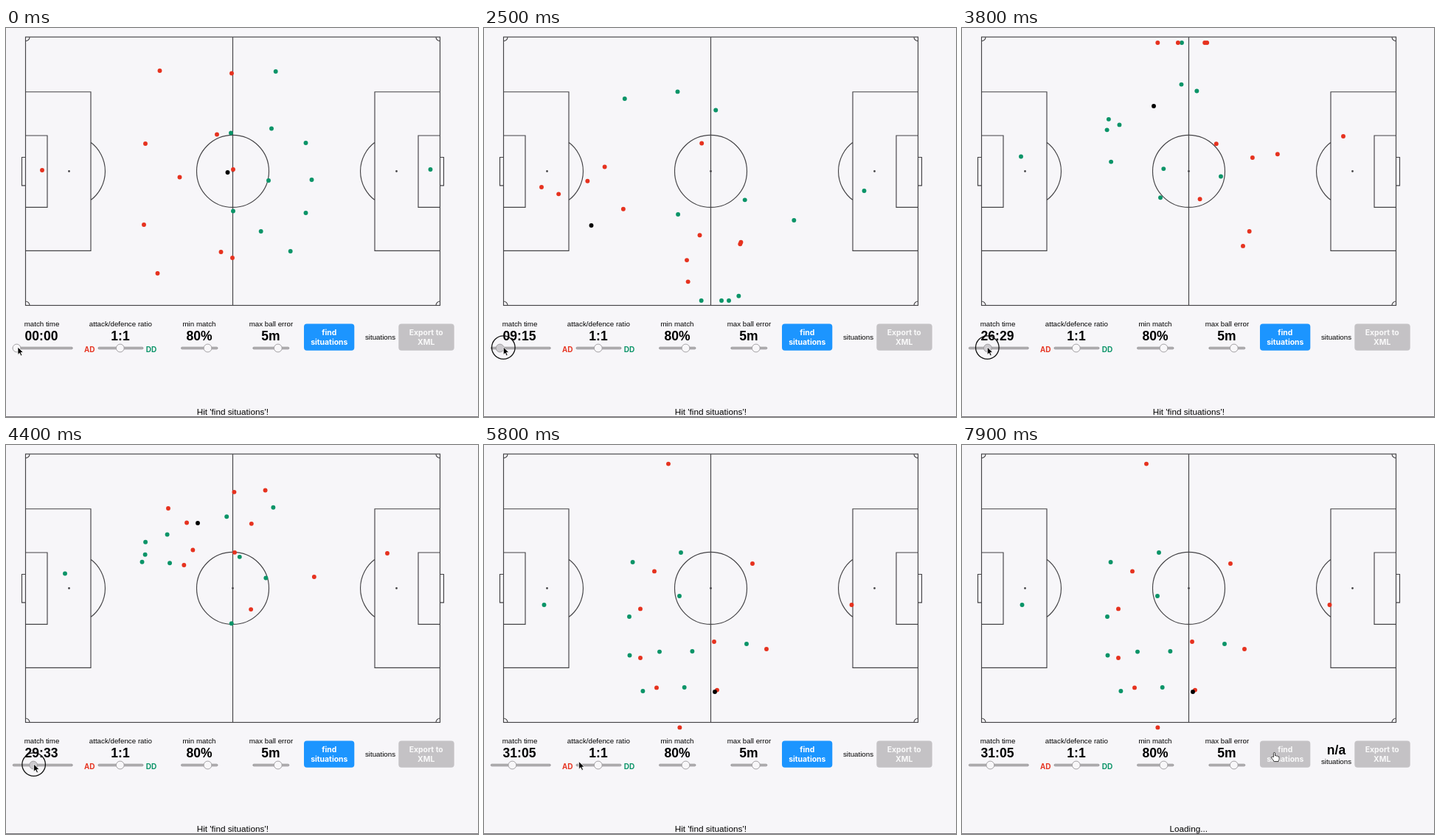
Recreate the animation shown at these times as an HTML page. Size 640 by 528 pixels, loop 8 s.

```html
<!DOCTYPE html>
<html lang="en">
<head>
<meta charset="utf-8">
<title>Match situations</title>
<style>
  html, body { margin: 0; width: 100%; height: 100%; overflow: hidden; background: #f7f6f9; }
  svg { display: block; width: 640px; height: 528px; }
  text { font-family: "Liberation Sans", Arial, sans-serif; text-anchor: middle; fill: #000; }
  .label { font-size: 9.75px; }
  .value { font-size: 17.5px; font-weight: 700; }
  .side { font-size: 10px; font-weight: 700; }
  .status { font-size: 11.75px; }
  .button { font: 700 10.4px Inter, sans-serif; fill: #fff; }
  .pitch { fill: none; stroke: #444346; stroke-width: 1.15; }
  .spot { fill: #333; }
  .track { fill: #b4b2b5; stroke: #8b898c; stroke-width: .8; }
  .thumb { fill: #f8f7f9; stroke: #99979a; stroke-width: .9; }
  .red { fill: #e6321f; }
  .green { fill: #0b9468; }
</style>
</head>
<body>
<svg viewBox="0 0 640 528">
  <path d="M0 527.5H640" stroke="#77757a"/>
  <g class="pitch">
    <rect x="26.5" y="12.2" width="562" height="364.3"/>
    <path d="M307.5 12.2V376.5"/>
    <circle cx="307.5" cy="194.4" r="49"/>
    <g id="half">
      <path d="M26.5 86.7H115V302.3H26.5M26.5 146H56V243.3H26.5M26.5 175.5H21.5V213.8H26.5M115 155.3A49 49 0 0 1 115 233.5"/>
      <path d="M32 12.2A5.5 5.5 0 0 1 26.5 17.7M26.5 371A5.5 5.5 0 0 1 32 376.5"/>
      <circle class="spot" cx="85.5" cy="194.4" r=".8"/>
    </g>
    <use href="#half" transform="matrix(-1 0 0 1 615 0)"/>
    <circle class="spot" cx="307.5" cy="194.4" r=".8"/>
  </g>
  <g id="players"></g>

  <text class="label" x="48.5" y="404.7">match time</text>
  <text class="label" x="155.3" y="404.7">attack/defence ratio</text>
  <text class="label" x="262" y="404.7">min match</text>
  <text class="label" x="359.5" y="404.7">max ball error</text>
  <text class="value" id="clock" x="48" y="423.5">00:00</text>
  <text class="value" x="155" y="423.5">1:1</text>
  <text class="value" x="262" y="423.5">80%</text>
  <text class="value" x="359" y="423.5">5m</text>
  <text class="side red" x="113.3" y="440">AD</text>
  <text class="side green" x="197" y="440">DD</text>
  <g id="sliders"></g>

  <rect id="focus" x="401.3" y="398.8" width="73.7" height="41.5" rx="4" fill="#8cc6fa"/>
  <rect id="find" x="404" y="401.5" width="68.3" height="36.3" rx="4"/>
  <g id="findText">
    <text class="button" x="438.3" y="417">find</text>
    <text class="button" x="438.3" y="430">situations</text>
  </g>
  <text class="value" id="count" x="507.5" y="419.5">n/a</text>
  <text class="label" id="unit" x="507.5">situations</text>
  <rect x="532.3" y="401.5" width="75.4" height="36.3" rx="4" fill="#c4c2c5"/>
  <g opacity=".9">
    <text class="button" x="569.7" y="417">Export to</text>
    <text class="button" x="569.7" y="430">XML</text>
  </g>
  <text class="status" id="status" x="307.3" y="525.3"></text>

  <g id="pointer">
    <circle id="ring" fill="none" stroke="#111" stroke-width="1.3"/>
    <path id="arrow" d="M0 0V10.4L2.4 8.2L4.1 12L5.9 11.2L4.2 7.5H7.5Z" fill="#000" stroke="#fff" stroke-width=".8"/>
    <path id="hand" transform="scale(.92)" d="M-1.2 6V.6Q-1.2-.6 0-.6T1.2.6V4.2Q2.2 3.3 3.2 4.6Q4.5 3.9 5.2 5.2Q7.2 4.8 7.2 6.8V9Q7 10.5 6 12.6H-.3L-2.6 9.4L-4.4 7Q-4.6 5.4-3 5.5Z" fill="#fff" stroke="#111" stroke-width=".9" stroke-linejoin="round"/>
  </g>
</svg>
<script>
const LOOP = 8000, SIZE = 11;
const TEAMS = ["green", "red"];
const $ = id => document.getElementById(id);

function add(parent, tag, attrs) {
  const el = document.createElementNS("http://www.w3.org/2000/svg", tag);
  set(el, attrs);
  return parent.appendChild(el);
}
function set(el, attrs) { for (const key in attrs) el.setAttribute(key, attrs[key]); }
function show(el, on) { el.style.display = on ? "" : "none"; }

const within = (t, from, to) => t >= from && t < to;
const clamp = (v, lo, hi) => Math.min(hi, Math.max(lo, v));
const linear = u => u;
const smooth = u => u * u * (3 - 2 * u);

// Value at time t along [time, value] keys.
function along(keys, t, ease) {
  const i = keys.findIndex(k => k[0] > t);
  if (i < 0) return keys[keys.length - 1][1];
  if (i === 0) return keys[0][1];
  const [t0, a] = keys[i - 1], [t1, b] = keys[i];
  return a + (b - a) * ease((t - t0) / (t1 - t0));
}

function random(seed) {
  const s = Math.sin(seed * 127.1) * 43758.5453;
  return s - Math.floor(s);
}

// The two resting poses are set out by hand, as x, y pairs with the keeper first.
const kickoff = {
  red: [49,193, 208.5,58, 306,61.5, 189,157, 286,144.5, 235.5,202.5, 308,192, 187,267, 291.5,304, 307,312, 205.5,333],
  green: [575.5,192, 365.7,59, 305,142.5, 360,136.5, 406.5,156, 356,207, 414.5,206, 308,248.5, 406.5,251, 345.7,276, 385.7,303],
  ball: [300.5,196]
};
const wing = {
  red: [498.5,217, 250,25.6, 231,171.4, 364,161, 212,222.4, 312,267, 383,277, 212,289, 234,329.4, 316,332.6, 265.4,383.4],
  green: [81.5,217, 201.6,159, 267,146, 265,205, 197,233, 197.5,285.5, 238,280.6, 282.4,280, 356,270, 215.4,334, 271.7,329],
  ball: [313,335]
};

// While scrubbing, a team is a keeper plus ten players spread over an ellipse.
const defending = {
  red: { keeper: [78, 216], centre: [239, 248], radius: [142, 106] },
  green: { keeper: [515.5, 221], centre: [276, 231], radius: [158, 168] },
  ball: [145.5, 268]
};
const midfield = {
  red: { keeper: [517, 147], centre: [307, 154], radius: [132, 176] },
  green: { keeper: [80, 174.5], centre: [277, 139], radius: [106, 144] },
  ball: [260, 106]
};

function spread({ keeper, centre, radius }, seed) {
  const points = [...keeper];
  for (let i = 1; i < SIZE; i++) {
    const angle = 2 * Math.PI * random(seed + i);
    const reach = Math.sqrt(random(seed + i + 0.5));
    points.push(
      centre[0] + radius[0] * reach * Math.cos(angle),
      clamp(centre[1] + radius[1] * reach * Math.sin(angle), 20, 370));
  }
  return points;
}

function poseAt(seconds) {
  if (seconds < 100) return kickoff;
  if (seconds >= 1800) return wing;
  const block = seconds < 1200 ? defending : midfield;
  return { red: spread(block.red, seconds), green: spread(block.green, seconds + 20), ball: block.ball };
}

const playKeys = [[1900, 0], [2500, 555], [3800, 1589], [4700, 1865]];
const pointerKeys = [
  [750, 16], [1150, 34], [1500, 34], [1850, 16], [1950, 16],
  [2500, 26.3], [3800, 34.3], [4700, 38.8], [5550, 38.8], [6350, 423.5]
];

const dot = team => add($("players"), "circle", { r: 2.95, class: team });
const dots = { ball: [dot("ball")] };
for (const team of TEAMS) dots[team] = Array.from({ length: SIZE }, () => dot(team));
$("players").append(dots.ball[0]);

function slider(x, width, thumb) {
  add($("sliders"), "rect", { class: "track", x, y: 433.2, width, height: 2.6, rx: 1.3 });
  return add($("sliders"), "circle", { class: "thumb", cx: thumb, cy: 434.5, r: 5.4 });
}
const timeThumb = slider(9.3, 81, 14.5);
slider(125, 61, 154.8);
slider(237.5, 49.5, 273.5);
slider(334.8, 49, 368.8);

let shown = -1;
function drawMatch(seconds) {
  if (seconds === shown) return;
  shown = seconds;
  const pad = n => String(Math.floor(n)).padStart(2, "0");
  $("clock").textContent = pad(seconds / 60) + ":" + pad(seconds % 60);
  timeThumb.setAttribute("cx", 14.5 + seconds * 0.0128);
  const pose = poseAt(seconds);
  for (const team in dots)
    dots[team].forEach((el, i) => set(el, { cx: pose[team][2 * i], cy: pose[team][2 * i + 1] }));
}

function drawButton(t) {
  const loading = t >= 7100;
  show($("focus"), within(t, 6700, 7100));
  set($("find"), { fill: loading ? "#c4c2c5" : "#1c95ff" });
  set($("findText"), { opacity: loading ? 0.9 : 1 });
  show($("count"), loading);
  set($("unit"), { y: loading ? 432.8 : 422.7 });
  $("status").textContent = loading ? "Loading..." : "Hit 'find situations'!";
}

function drawPointer(t) {
  const x = along(pointerKeys, t, smooth);
  const y = 433 - 15 * Math.max(0, x - 38.8) / 384.7;
  const over = x > 404;
  set($("pointer"), { transform: `translate(${x} ${y})` });
  show($("arrow"), !over);
  show($("hand"), over);
  show($("ring"), within(t, 700, 1600) || within(t, 1950, 5000) || within(t, 6650, 7350));
  set($("ring"), { r: over ? 22.3 : 15.8, cy: 0.6 });
}

function render(t) {
  // The match view refreshes ten times a second.
  const tick = Math.floor(t / 100) * 100;
  drawMatch(Math.round(along(playKeys, tick, linear)));
  timeThumb.style.fill = within(t, 2000, 5000) ? "#cccace" : "";
  drawButton(t);
  drawPointer(t);
}

function frame() {
  render(performance.now() % LOOP);
  requestAnimationFrame(frame);
}
frame();
</script>
</body>
</html>
```
